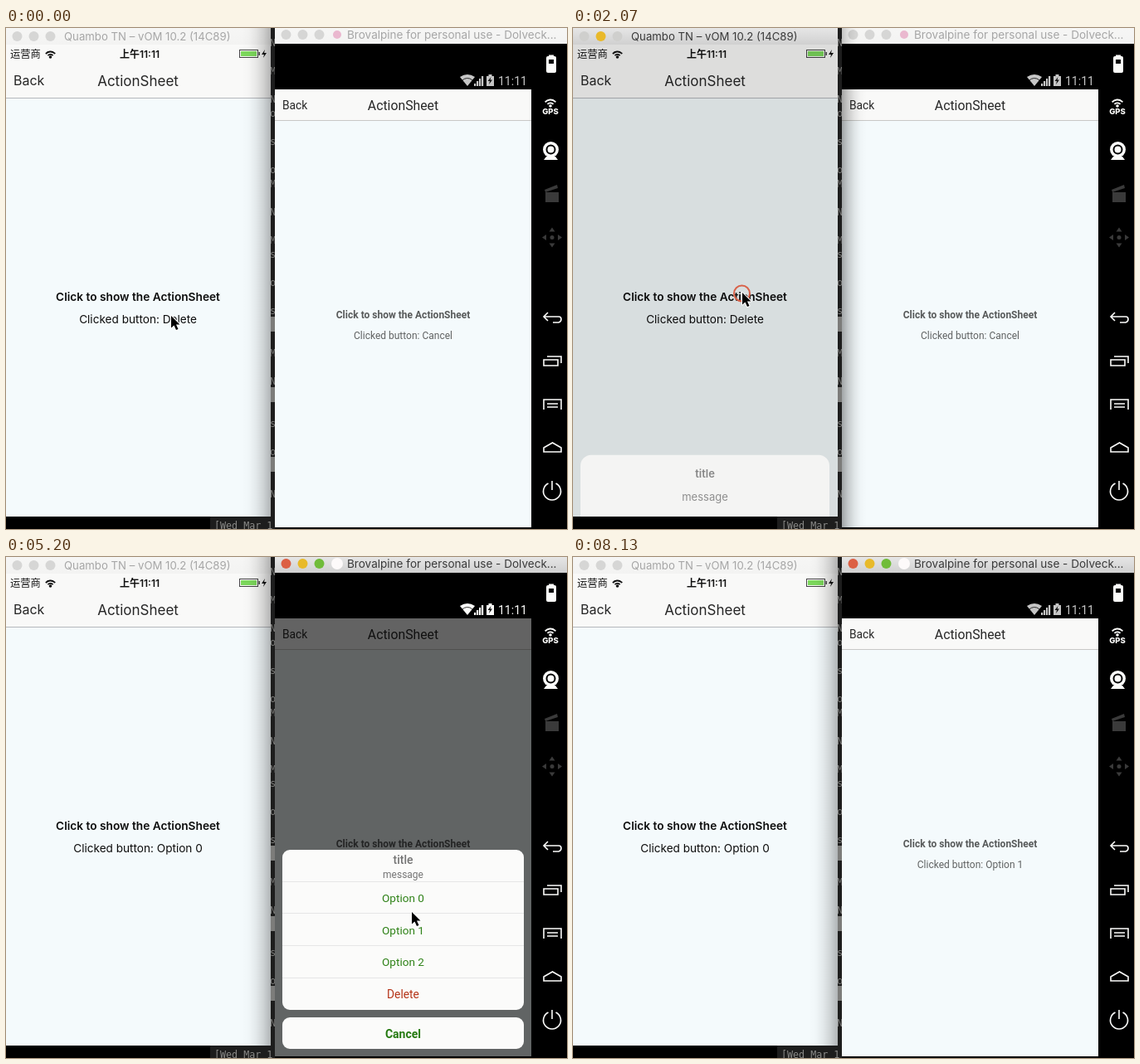
An HTML page with a canvas for the animation above (8.19 s loop, 676 by 604 pixels).

```html
<!DOCTYPE html>
<html lang="en">
<head>
<meta charset="utf-8">
<title>ActionSheet on two phones</title>
<style>
html, body { margin: 0; width: 100%; height: 100%; overflow: hidden; background: #000; }
canvas { display: block; }
</style>
</head>
<body>
<canvas id="stage" width="676" height="604"></canvas>
<script>
const c = document.getElementById('stage').getContext('2d');
const LOOP = 8190;
const UI = 'Inter, "Noto Sans CJK SC", "Noto Sans CJK", sans-serif';
const DROID = 'Roboto, sans-serif';
const MONO = '"DejaVu Sans Mono", monospace';
const PAGE = '#f4fafc', BAR = '#f9f9f8', ICON = '#fdfdfb', FAINT = '#3a3a3a';

// Eased progress of t from a to b
function ease(t, a, b) {
  const p = Math.min(1, Math.max(0, (t - a) / (b - a)));
  return p < .5 ? 2 * p * p : 1 - 2 * (1 - p) ** 2;
}
function box(x, y, w, h, fill) { c.fillStyle = fill; c.fillRect(x, y, w, h); }
function card(x, y, w, h, r, fill) {
  c.fillStyle = fill; c.beginPath(); c.roundRect(x, y, w, h, r); c.fill();
}
function disc(x, y, r, fill) { c.fillStyle = fill; c.beginPath(); c.arc(x, y, r, 0, 7); c.fill(); }
function ring(x, y, r, color, width) {
  c.strokeStyle = color; c.lineWidth = width;
  c.beginPath(); c.arc(x, y, r, 0, 7); c.stroke();
}
function path(d, color, width) {
  const p = new Path2D(d);
  if (width) { c.strokeStyle = color; c.lineWidth = width; c.stroke(p); }
  else { c.fillStyle = color; c.fill(p); }
}
function text(s, x, y, size, color, family = UI, weight = 400, align = 'center') {
  c.font = `${weight} ${size}px ${family}`;
  c.textAlign = align; c.fillStyle = color; c.fillText(s, x, y);
}
function clipped(x, y, w, h, draw) {
  c.save(); c.beginPath(); c.rect(x, y, w, h); c.clip(); draw(); c.restore();
}
function wifi(x, y, r, color) {
  c.strokeStyle = color; c.lineWidth = 1.8;
  for (const k of [.55, 1]) {
    c.beginPath(); c.arc(x, y, r * k, -Math.PI * .77, -Math.PI * .23); c.stroke();
  }
  disc(x, y - 1, 1.8, color);
}
// Window shadow, strongest at x0
function shade(x0, x1, y, h, alpha) {
  const g = c.createLinearGradient(x0, 0, x1, 0);
  for (let i = 0; i <= 4; i++) g.addColorStop(i / 4, `rgba(0,0,0,${alpha * (1 - i / 4) ** 2})`);
  box(Math.min(x0, x1), y, Math.abs(x1 - x0), h, g);
}
function titleBar(x, w, h, y, active, lights) {
  const g = c.createLinearGradient(0, 0, 0, h);
  g.addColorStop(0, active ? '#e6e6e6' : '#f6f6f5');
  g.addColorStop(1, active ? '#d0d0d0' : '#f3f3f2');
  box(x, 0, w, h, g);
  lights.forEach((color, i) => disc(x + 13.5 + 20 * i, y, 6, active ? color : '#d6d6d5'));
}

function backdrop() {
  box(0, 0, 676, 604, '#000');
  box(319, 0, 5, 604, '#1d1d1d');
  clipped(319, 0, 5, 589, () => {
    for (let i = 1; i < 34; i++)
      if (i * 7 % 5 < 3) text('sNoM'[i % 4], 318, i * 17 + 5, 12, '#7c7c7a', MONO, 400, 'left');
    for (const y of [348, 433, 517]) box(319, y, 5, 18, '#7c7c7a');
  });
  box(246, 589, 78, 15, '#1d1d1d');
  text('[Wed Mar 1', 251, 603.5, 11.7, '#8a8a88', MONO, 400, 'left');
}

function leftPhone(t, open, front) {
  titleBar(0, 319, 20, 10, front, ['#cfcfcd', '#e9b92a', '#cfcfcd']);
  text('Quambo TN – vOM 10.2 (14C89)', 70, 15, 13.2, front ? '#3a3a3a' : '#a6a6a6', UI, 400, 'left');
  box(0, 20, 319, 569, PAGE);
  box(0, 20, 319, 64, BAR);
  box(0, 84, 319, 1, '#b6b8bc');
  text('运营商', 5, 35.5, 12.3, '#161616', UI, 400, 'left');
  wifi(53.5, 36, 7.5, '#111');
  text('上午11:11', 161, 35.5, 12, '#111', UI, 600);
  c.strokeStyle = '#444'; c.lineWidth = 1;
  c.strokeRect(281.5, 26.5, 22, 9);
  box(283, 28, 19, 6, '#7cd85c');
  box(304.5, 29, 1.5, 4, '#444');
  path('M312 26l-4 6h3l-1 4 4-6h-3z', '#111');
  text('Back', 9, 69, 16, '#262626', UI, 400, 'left');
  text('ActionSheet', 159, 69.5, 17, '#262626');
  text('Click to show the ActionSheet', 159, 328.5, 13.7, '#0c0c0c', UI, 600);
  text('Clicked button: ' + (t < 2200 ? 'Delete' : 'Option 0'), 159, 355.5, 13.6, '#0c0c0c');

  if (open > 0) clipped(0, 20, 319, 569, () => {
    box(0, 20, 319, 569, `rgba(0,0,0,${.43 * open ** .8})`);
    c.translate(0, 388 * (1 - open));
    card(9, 201, 300, 313, 13, '#f4f4f3');
    text('title', 159, 228, 13, '#868686', UI, 600);
    text('message', 159, 256, 13, '#8e8e8e');
    for (const y of [284, 456]) box(9, y, 300, 1, '#dadadd');
    for (const y of [341, 399]) box(9, y, 300, 1, '#eeeeec');
    for (let i = 0; i < 3; i++) text('Option ' + i, 159, 320 + 57.5 * i, 19, '#38701c');
    text('Delete', 159, 492.5, 18.7, '#c9482a');
    card(9, 522, 300, 57, 13, '#fdfdfc');
    text('Cancel', 159, 557.5, 19.2, '#34691a', UI, 600);
  });
  if (!front) shade(319, 284, 0, 589, .28);
}

function statusIcons(color) {
  path('M547 59Q556 53 565 59L556 70Z', color);
  c.strokeStyle = '#000'; c.lineWidth = .8;
  c.beginPath(); c.arc(556, 69, 8.5, -Math.PI * .77, -Math.PI * .23); c.stroke();
  for (let i = 0; i < 4; i++) box(564 + 3 * i, 67 - 3 * i, 2.2, 3 + 3 * i, color);
  path('M579 58h2.5v-2h4v2h2.5v12h-9z', color);
  path('M584.5 59l-4 5h2.5l-1 4 4-5.5h-2.5z', '#111');
  text('11:11', 593, 69, 14, color, DROID, 400, 'left');
}

function rightPhone(t, open, front) {
  const fading = t > 6440 && t < 6690;
  titleBar(324, 352, 19, 8, front, ['#dc6044', '#e8ba2a', '#70bc3a']);
  disc(399, 8, front ? 7 : 5, front ? '#fdfafa' : '#eab8cf');
  text('Brovalpine for personal use - Dolveck...', 411, 13, 13.55, front ? '#3a3a3a' : '#a6a6a6', UI, 400, 'left');
  box(324, 19, 309, 583, '#000');
  if (fading) box(324, 53, 309, 21, '#2c2c2c');
  box(324, 74, 309, 528, PAGE);
  box(324, 74, 309, 37, BAR);
  box(324, 111, 309, 1, '#c8c8c6');
  text('Back', 333, 98, 13.8, '#282828', DROID, 400, 'left');
  text('ActionSheet', 478.5, 99, 15.8, '#282828', DROID);
  text('Click to show the ActionSheet', 478.5, 349.5, 12, '#585a5a', DROID, 700);
  text('Clicked button: ' + (t < 6440 ? 'Cancel' : 'Option 1'), 478.5, 374.5, 12, '#606262', DROID);

  if (open > 0) clipped(324, 74, 309, 528, () => {
    box(324, 74, 309, 528, `rgba(0,0,0,${.6 * open})`);
    c.translate(0, 249 * (1 - open));
    card(333, 353, 291, 193, 9, '#fbfbfa');
    text('title', 478.5, 369.5, 14, '#747474', DROID, 500);
    text('message', 478.5, 386.5, 12, '#747474', DROID);
    for (const y of [391, 429, 468, 507]) box(333, y, 291, 1, '#e6e6e6');
    for (let i = 0; i < 3; i++) text('Option ' + i, 478.5, 416 + 38.7 * i, 13.6, '#2f8218', DROID);
    text('Delete', 478.5, 532, 13.8, '#b53418', DROID);
    card(333, 555, 291, 38, 9, '#fbfbfa');
    text('Cancel', 478.5, 579.5, 14, '#267a12', DROID, 700);
  });
  if (!front && t > 400) {
    shade(324, 354, 74, 528, .34);
    shade(324, 346, 0, 19, .2);
  }
  statusIcons(open > .5 || fading ? ICON : '#c6c6c6');
}

function sidebar() {
  box(633, 19, 43, 585, '#000');
  card(651, 34, 12, 20, 2, ICON);
  box(654, 32.5, 6, 2, ICON);
  box(654, 38, 6, 5, '#000');
  wifi(656, 95, 8.5, ICON);
  text('GPS', 656, 103.5, 9.5, ICON, UI, 800);
  disc(656.5, 146.5, 9.5, ICON);
  ring(656.5, 146.5, 5, '#000', 2);
  path('M651 155h11l3 4h-17z', ICON);
  box(650, 198, 16, 12, FAINT);
  path('M649 195l15-6 1 4-15 5z', FAINT);
  disc(658, 252.5, 2.5, FAINT);
  for (let i = 0; i < 4; i++) {
    c.save(); c.translate(658, 252.5); c.rotate(i * Math.PI / 2);
    path('M0 -12l3.5 5h-7z', FAINT);
    c.restore();
  }
  path('M653 343l-5 5 5 5M648 348h18q3 0 3 3t-3 4h-7', ICON, 1.6);
  path('M648 400h17v7h-17zM652 396h17v8', ICON, 1.6);
  path('M648 460v-12h21v12M652 453h13M652 457h13', ICON, 1.6);
  path('M648 511v-5l10.5-6 10.5 6v5z', ICON, 1.6);
  path('M653.5 549a10.5 10.5 0 1 0 9 0M658 546v11', ICON, 1.6);
}

// Pointer stops: time, x, y
const stops = [
  [0, 199, 347], [150, 199, 347], [420, 203, 324], [900, 203, 324],
  [1300, 194, 325], [1500, 194, 325], [1750, 204, 319], [2350, 204, 319],
  [3150, 517, 346], [4250, 517, 346], [5000, 489, 428], [5300, 489, 428],
  [5800, 487, 452], [6850, 487, 452], [7600, 470, 615], [LOOP, 470, 615]
];
// Mouse presses: start, end
const presses = [[450, 600], [720, 860], [1780, 2130], [3250, 3400], [3780, 3960], [6030, 6190]];

function pointer(t) {
  const i = stops.findIndex(s => s[0] > t);
  const [a, x, y] = stops[i - 1], [b, u, v] = stops[i], p = ease(t, a, b);
  const px = x + (u - x) * p, py = y + (v - y) * p;
  if (presses.some(([start, end]) => t >= start && t < end))
    ring(px - .5, py + 1, 9.5, t < 3200 ? '#d9624a' : '#d47a42', 2);
  c.save(); c.translate(px, py);
  c.lineJoin = 'round';
  const arrow = 'M0 0V14.5L3.5 11.5 6 17 8.5 16 6 10.5H10.5Z';
  path(arrow, '#fff', 2);
  path(arrow, '#000');
  c.restore();
}

function frame(now) {
  const t = now % LOOP;
  const openLeft = ease(t, 780, 1180) - ease(t, 1850, 2170);
  const openRight = ease(t, 3960, 4280) - ease(t, 6160, 6440);
  backdrop();
  leftPhone(t, openLeft, t >= 500 && t < 3300);
  rightPhone(t, openRight, t >= 3300);
  sidebar();
  pointer(t);
  requestAnimationFrame(frame);
}
requestAnimationFrame(frame);
</script>
</body>
</html>
```
